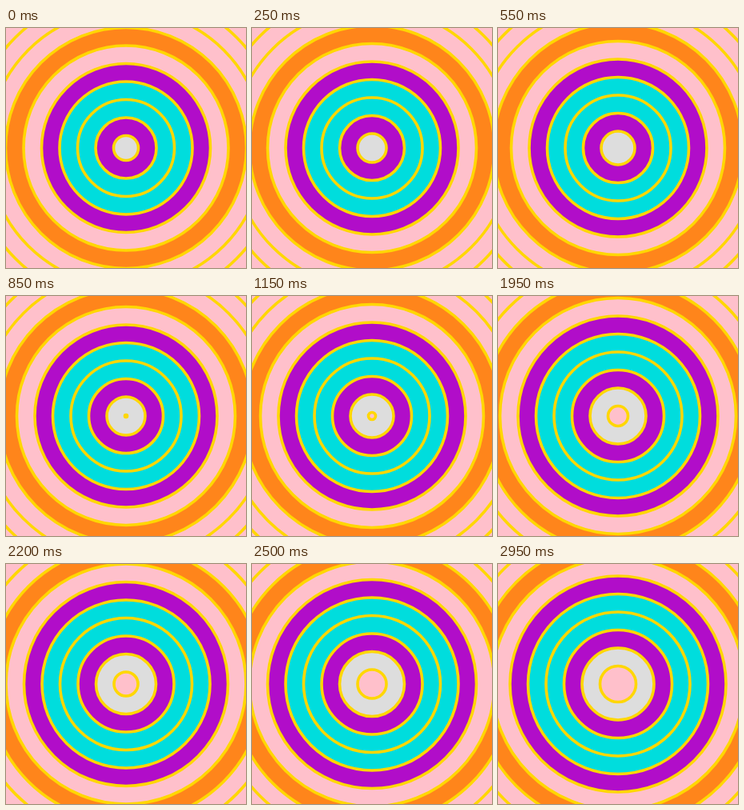
Recreate the animation shown at these times as an HTML page with a canvas. Size 300x300 px, loop 3000 ms.

```html
<!DOCTYPE html>
<html lang="en">
<head>
<meta charset="utf-8">
<title>Growing rings</title>
<style>
  html, body { margin: 0; width: 100%; height: 100%; overflow: hidden; background: pink; }
  canvas { display: block; }
</style>
</head>
<body>
<canvas id="stage" width="300" height="300"></canvas>
<script>
  const ctx = document.getElementById('stage').getContext('2d');
  const LOOP = 3000, STEP = 50, GROWTH = 0.5;
  const FIRST = -7, SPACING = 22.5;
  const PINK = '#ffc0cb', ORANGE = '#ff851b', PURPLE = '#b10dc9', CYAN = '#00dddd', SILVER = '#dddddd';

  // Fills from the centre outwards
  const fills = [PINK, SILVER, PURPLE, CYAN, CYAN, PURPLE, PINK, ORANGE, PINK, PINK];

  function draw(now) {
    const step = Math.floor(now % LOOP / STEP);
    ctx.fillStyle = PINK;
    ctx.fillRect(0, 0, 300, 300);
    ctx.strokeStyle = '#ffd700';
    ctx.lineWidth = 3.6;
    for (let i = fills.length - 1; i >= 0; i--) {
      const radius = FIRST + SPACING * i + GROWTH * step;
      if (radius <= 0) continue;
      ctx.beginPath();
      ctx.arc(150, 150, radius, 0, Math.PI * 2);
      ctx.fillStyle = fills[i];
      ctx.fill();
      ctx.stroke();
    }
  }

  const begin = performance.now();
  function tick() {
    draw(performance.now() - begin);
    requestAnimationFrame(tick);
  }
  tick();
</script>
</body>
</html>
```
